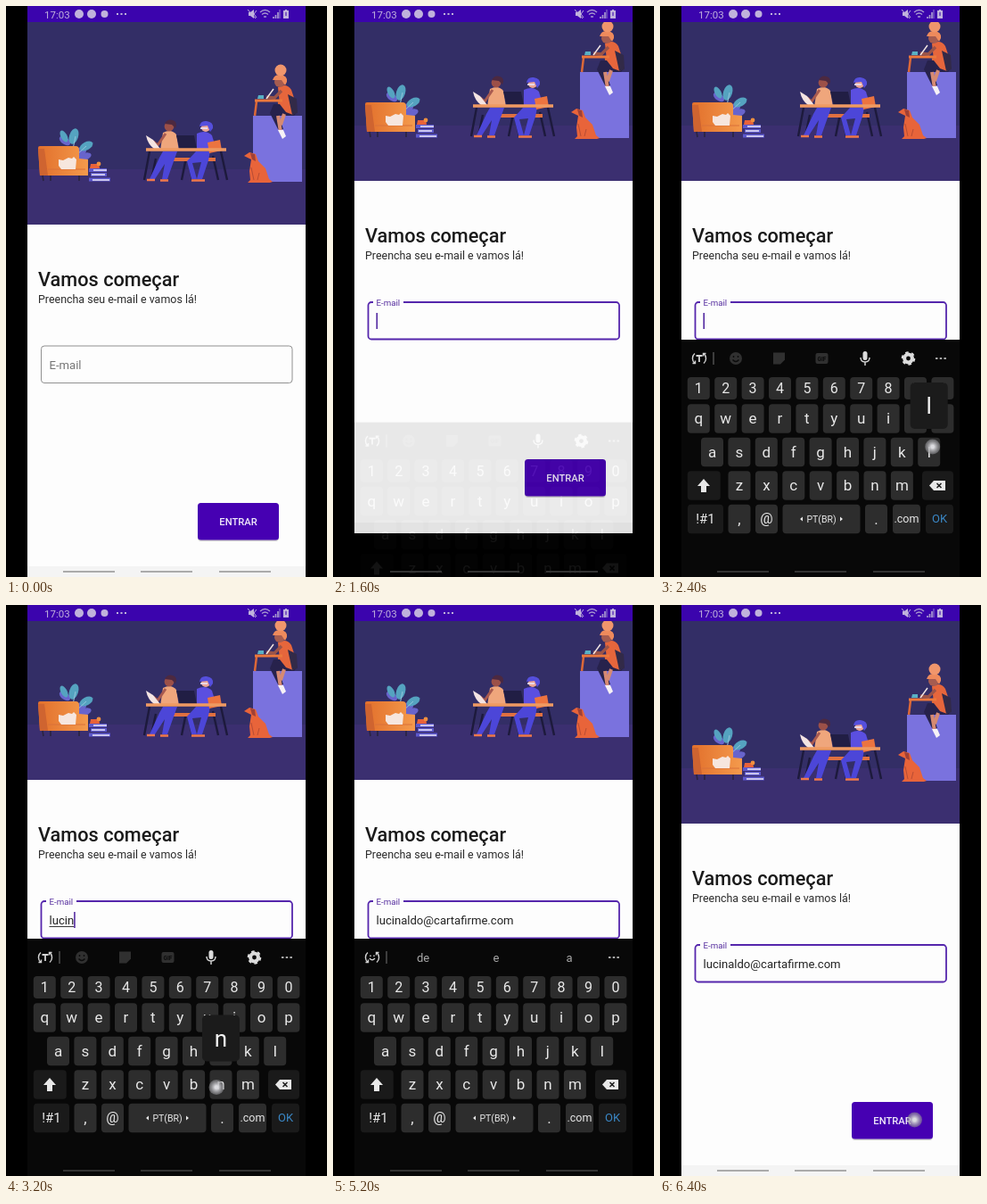
An HTML page for the animation above (6470 ms loop, 360 by 640 pixels).

```html
<!DOCTYPE html>
<html lang="pt-BR">
<head>
<meta charset="utf-8">
<title>Vamos começar</title>
<style>
  html, body { margin: 0; width: 100%; height: 100%; overflow: hidden; background: #000; }
  svg { display: block; width: 360px; height: 640px; font-family: Roboto, "Noto Sans", sans-serif; }
  .mid { text-anchor: middle; }
</style>
</head>
<body>
<svg id="stage" viewBox="0 0 360 640" xmlns="http://www.w3.org/2000/svg">
  <defs>
    <clipPath id="screen"><rect x="24" width="312" height="640"/></clipPath>
    <linearGradient id="sofa"><stop stop-color="#e2702c"/><stop offset="1" stop-color="#f49a4c"/></linearGradient>
    <radialGradient id="dot"><stop offset=".2" stop-color="#dcdce0"/><stop offset="1" stop-color="#88888c" stop-opacity=".55"/></radialGradient>
  </defs>
  <rect width="360" height="640"/>
  <g clip-path="url(#screen)">
    <g id="page">
      <rect x="24" y="0" width="312" height="640" fill="#fdfdfd"/>
      <rect x="24" y="628" width="312" height="12" fill="#f4f4f4"/>
      <g id="art">
        <rect x="24" y="18" width="312" height="227" fill="#332e66"/>
        <rect x="24" y="183" width="312" height="62" fill="#3b2f70"/>
        <!-- plant, sofa, cat, books -->
        <g fill="#6864cc">
          <ellipse cx="88" cy="169" rx="8" ry="4" transform="rotate(-20 88 169)"/>
          <ellipse cx="66" cy="151" rx="7" ry="4" transform="rotate(35 66 151)"/>
          <ellipse cx="83" cy="164" rx="8" ry="5" transform="rotate(-35 83 164)"/>
        </g>
        <g fill="#55a3c0">
          <ellipse cx="76" cy="146" rx="5" ry="9" transform="rotate(18 76 146)"/>
          <ellipse cx="90" cy="157" rx="8" ry="4.5" transform="rotate(-28 90 157)"/>
          <ellipse cx="65" cy="146" rx="3.5" ry="7" transform="rotate(-28 65 146)"/>
        </g>
        <path d="M78 146L73 170M90 157L78 168" stroke="#93c6dc" fill="none"/>
        <path d="M36 159q0-2 2-2h40q4 0 4 4v10l10 1v18H38z" fill="url(#sofa)"/>
        <path d="M36 160h7l4 30h-9z" fill="#cf6430"/>
        <path d="M47 183h42" stroke="#d9703a"/>
        <path d="M41 190l1 6M50 190v6M82 190v6" stroke="#2a2340" stroke-width="1.6"/>
        <path d="M59 172l5 1 6-3 4 1 2-2 3 3-1 11H62l-3-4z" fill="#f6e6de"/>
        <path d="M95 177h9l1 5H94z" fill="#e8623a"/><circle cx="104" cy="177" r="2.4" fill="#f0903f"/>
        <path d="M93 184h20M95 189h18M93 194.500h24" stroke="#5c58cc" stroke-width="4"/>
        <path d="M98 184h15M96 189h15M97 195h19" stroke="#eee9f8" stroke-width="1.7"/>
        <!-- table and two people -->
        <path d="M161 163l-6 32M241 163l7 32M168 171l-5 24M232 168l6 27M202 170l-5 25M204 170l5 25" stroke="#1d1a3c" stroke-width="2.4"/>
        <path d="M172 170h63v4h-62z" fill="#e07040"/>
        <path d="M176 163h16l-5 14-6 17h-6l3-17-11 17h-6l11-24z" fill="#4c46d8"/>
        <path d="M213 163h16l-2 10-7 21h-6l5-19-10 1 5 18h-6l-5-20z" fill="#4c46d8"/>
        <path d="M158 195h9M173 195.500h9M208 195.500h8M216 195.500h7" stroke="#f0784c" stroke-width="2.4"/>
        <path d="M176 142q9-5 15 2l3 18h-21z" fill="#efa67c"/>
        <path d="M179 143l-9 13-5-4" fill="none" stroke="#a85a50" stroke-width="3"/>
        <circle cx="183" cy="135" r="5.400" fill="#9c5048"/>
        <path d="M178 132q3-6 9-4 6 2 3 9l-4-4z" fill="#4c2940"/>
        <path d="M157 145l8 5 8 10h-7q-7-5-9-15z" fill="#f4e4e2"/>
        <path d="M214 143q10-5 17 2l5 17h-22z" fill="#5b4fe0"/>
        <circle cx="224" cy="136" r="5" fill="#eba596"/>
        <path d="M217 135q1-7 8-6 8 1 7 8l-3 4-3-7z" fill="#554fdc"/>
        <path d="M218 137h8" stroke="#ebe5fb" stroke-width="1.6"/>
        <path d="M191 145h20l3 16h-19z" fill="#211e44"/>
        <path d="M226 153l14-3 2 12-14 3z" fill="#ec7440"/>
        <path d="M157 161h90" stroke="#ef9a62" stroke-width="3.400"/>
        <!-- plinth with writer, dog -->
        <rect x="277" y="123" width="55" height="74" fill="#7a72de"/>
        <path d="M281 107l-2 16M306 107l2 16" stroke="#dc6838" stroke-width="2.500"/>
        <path d="M300 110h21l6 8-4 5h-17l5 15h-6l-9-18z" fill="#27224c"/>
        <path d="M305 123l3 18M312 121l-4 12" stroke="#d68a72" stroke-width="4"/>
        <path d="M305 139h6l3 7-4 3z" fill="#f7f2f6"/>
        <path d="M305 91q10-5 15 3l6 18-4 10-8-3-7-9z" fill="#e6663c"/>
        <path d="M316 99l10 5 1 16-6 2z" fill="#322a48"/>
        <path d="M309 95l-8 8-9-1" fill="none" stroke="#9c5448" stroke-width="3.400"/>
        <circle cx="307" cy="85" r="6" fill="#a65c50"/>
        <path d="M299 83q2-7 9-6 8 1 7 8l-2 4-4-6z" fill="#ee8a5c"/>
        <circle cx="308" cy="72" r="6.500" fill="#f0966c"/>
        <path d="M292 104l8-11" stroke="#f3e7e4" stroke-width="1.400"/>
        <path d="M279 106h31" stroke="#ec783c" stroke-width="3"/>
        <path d="M283 100h6v4h-7z" fill="#58b0c4"/>
        <path d="M267 168l6-4 7 2 3 8 8 8 4 12 4 3-3 1h-25l3-3-1-10 2-13z" fill="#e8643a"/>
        <path d="M274 165l5 1 1 8-4-2z" fill="#a04036"/><path d="M275 181l3 14M284 187l-2 8" stroke="#b84c34"/>
      </g>
      <text x="36" y="314" font-size="21.700" font-weight="500" fill="#1a1a1a">Vamos começar</text>
      <text x="36" y="333" font-size="12.450" fill="#2b2b2b">Preencha seu e-mail e vamos lá!</text>
      <rect id="box" x="39.500" y="381" width="281.500" height="41.500" rx="3.500" fill="none"/>
      <rect id="notch" x="45" y="377" width="34" height="8" fill="#fdfdfd"/>
      <text id="label" x="48.500">E-mail</text>
      <text id="email" x="48.500" y="407" font-size="13.100" fill="#222"></text>
      <path id="underline" stroke="#3a3a3a" stroke-width="1"/>
      <rect id="caret" y="393" width="1.500" height="18" fill="#4b1f9c"/>
      <rect x="215" y="559" width="91" height="41" rx="4" fill="#000" opacity=".18"/>
      <rect x="215" y="557" width="91" height="41.500" rx="3.500" fill="#4600b2"/>
      <text x="260.500" y="582" class="mid" font-size="11.200" font-weight="500" fill="#f1eafa">ENTRAR</text>
    </g>
    <g id="status" fill="#c0b2dc">
      <rect x="24" width="312" height="18" fill="#3b04ad"/>
      <text x="43" y="13.500" font-size="11.500">17:03</text>
      <circle cx="82" cy="9" r="5"/><circle cx="96" cy="9" r="5"/><circle cx="110.500" cy="9" r="4"/>
      <path d="M124 9h2m2.500 0h2m2.500 0h2" stroke="#c0b2dc" stroke-width="1.800"/>
      <path d="M272 7h2l4-3v10l-4-3h-2z"/>
      <path d="M271 4l9 10M281 5l-3 4 3 4" fill="none" stroke="#c0b2dc"/>
      <path d="M285 7q5.500-5 11 0M287 9.500q3.500-3 7 0M289 12h3" fill="none" stroke="#a898d0" stroke-width="1.400"/>
      <path d="M300 14v-2M302.500 14v-4M305 14V7" stroke="#a898d0" stroke-width="1.700"/>
      <path d="M307 14V4" stroke="#6f50c0" stroke-width="1.700"/>
      <path d="M311 5h2V4h2v1h2v9h-6z"/><path d="M314 7v4" stroke="#3b04ad"/>
    </g>
    <g id="keyboard">
      <rect x="24" y="374" width="312" height="266" fill="#080808"/>
      <g fill="none" stroke="#d4d4d4" stroke-width="1.400">
        <path d="M39 400.500a7.200 7.200 0 0 1 0-11M49 389.500a7.200 7.200 0 0 1 0 11M36.500 400.500h3v-3M51.500 389.500h-3v3"/>
        <path d="M60 388v14" stroke="#555"/>
        <path id="toolT" d="M40.500 392h7M44 392v7" stroke-width="1.800"/>
        <path id="toolSmile" d="M42 392.500v1.500M46 392.500v1.500M41 396q3 3.500 6 0"/>
      </g>
      <g id="tools">
        <g fill="#303030">
          <circle cx="85" cy="395" r="7"/><path d="M127 388.500h13v8l-5 5h-8z"/><rect x="174.500" y="389" width="14" height="12" rx="2"/>
        </g>
        <path d="M82.500 392v2M87.500 392v2M81.500 396.500q3.500 4 7 0" fill="none" stroke="#0c0c0c" stroke-width="1.400"/>
        <text x="181.500" y="397.500" class="mid" font-size="6.500" font-weight="700" fill="#0c0c0c">GIF</text>
        <rect x="227.500" y="387" width="5" height="10" rx="2.500" fill="#dcdcdc"/>
        <path d="M225 394q0 5 5 5t5-5M230 399v4" fill="none" stroke="#dcdcdc" stroke-width="1.400"/>
        <circle cx="278.500" cy="395" r="4.400" fill="none" stroke="#dcdcdc" stroke-width="4"/>
        <circle cx="278.500" cy="395" r="6.600" fill="none" stroke="#dcdcdc" stroke-width="2.400" stroke-dasharray="3.450"/>
      </g>
      <g id="words" class="mid" font-size="13" fill="#aaa"><text x="101" y="400">de</text><text x="183" y="400">e</text><text x="265" y="400">a</text></g>
      <path d="M309 395h2.500m2.200 0h2.500m2.200 0h2.500" stroke="#aaa" stroke-width="2"/>
      <g id="keys"></g>
    </g>
    <path id="nav" d="M64 634h58M151 634h58M239 634h58" stroke-width="2.200"/>
    <g id="popup"><rect x="-21" y="-26" width="42" height="52" rx="5" fill="#1b1b1b"/><text class="mid" y="9" font-size="26" fill="#f4f4f4"></text></g>
    <circle id="touch" r="8.500" fill="url(#dot)"/>
  </g>
</svg>
<script>
const LOOP = 6470, PITCH = 30.4;
const $ = id => document.getElementById(id);
const set = (el, attrs) => { for (const k in attrs) el.setAttribute(k, attrs[k]); };
const show = (el, on) => el.setAttribute('visibility', on ? 'visible' : 'hidden');
const ramp = (t, a, b) => Math.min(1, Math.max(0, (t - a) / (b - a)));
const easeOut = x => 1 - (1 - x) ** 3;
const lerp = (a, b, k) => a + (b - a) * k;

// Keyboard
const INK = '#e8e8e8', DARK_KEY = '#1a1a1a';
const keyPos = {};
let keyMarkup = '';
function addKey(label, x, y, w, h = 32.5, size = 17, color = INK, fill = '#2d2d2d') {
  keyPos[label] = [x, y];
  keyMarkup += `<rect x="${x - w / 2}" y="${y - h / 2}" width="${w}" height="${h}" rx="4" fill="${fill}"/>` +
    `<text x="${x}" y="${y + size * .34}" class="mid" font-size="${size}" fill="${color}">${label}</text>`;
}
function addRow(chars, x, y, h, size) {
  [...chars].forEach((c, i) => addKey(c, x + i * PITCH, y, 25, h, size));
}
addRow('1234567890', 43.3, 428.5, 25, 16);
addRow('qwertyuiop', 43.3, 462.5);
addRow('asdfghjkl', 58.5, 500);
addRow('zxcvbnm', 89, 537.5);
addKey('', 49.3, 537.5, 37, 32.5, 17, INK, DARK_KEY);
addKey('', 311.5, 537.5, 35, 32.5, 17, INK, DARK_KEY);
addKey('!#1', 51, 575, 40, 32.5, 15, INK, DARK_KEY);
addKey(',', 89, 575, 25);
addKey('@', 119.5, 575, 25, 32.5, 16);
addKey('PT(BR)', 181, 575, 87, 32.5, 10.5);
addKey('.', 242.5, 575, 25);
addKey('.com', 276.5, 575, 31, 32.5, 12.5);
addKey('OK', 313.5, 575, 31, 32.5, 13, '#3a86c4', DARK_KEY);
$('keys').innerHTML = keyMarkup +
  `<g fill="${INK}"><path d="M49 530l7 8h-4v7h-6v-7h-4z"/><path d="M302 537.500l5-5.500h13v11h-13z"/>
   <path d="M160 572.500v5l-3-2.500zM202 572.500v5l3-2.500z"/></g>
   <path d="M310.500 535l5 5m0-5l-5 5" stroke="${DARK_KEY}" stroke-width="1.500"/>`;

// Typing: each press is [key, time]; the rest of the address is completed at once.
const ADDRESS = 'lucinaldo@cartafirme.com';
const FOCUS = 1380, FILLED = 4540, HOLD = 115;
const presses = [2350, 2590, 2790, 2980, 3130, 3400, 3560, 3720, 3880, 4080, 4220, 4340]
  .map((time, i) => [ADDRESS[i], time]);
const typedAt = time => time + 60;

function caretOn(t) {
  let reset = FOCUS;
  for (const [, time] of presses) if (t >= typedAt(time)) reset = typedAt(time);
  if (t >= FILLED) reset = FILLED;
  return t >= FOCUS && (t - reset) % 1000 < 500;
}

function drawField(t) {
  const focus = easeOut(ramp(t, FOCUS, FOCUS + 150));
  const count = t >= FILLED ? ADDRESS.length : presses.filter(p => t >= typedAt(p[1])).length;
  const focused = focus > 0;
  set($('box'), { stroke: focused ? '#5526ac' : '#909090', 'stroke-width': focused ? 1.8 : 1 });
  set($('notch'), { transform: `translate(${62 * (1 - focus)} 0) scale(${focus} 1)` });
  set($('label'), { y: lerp(406.5, 385.2, focus), 'font-size': lerp(13.1, 9.7, focus), fill: focused ? '#5830a0' : '#757575' });
  $('email').textContent = ADDRESS.slice(0, count);
  const end = 48.5 + (count ? $('email').getComputedTextLength() : 0);
  set($('caret'), { x: end });
  show($('caret'), caretOn(t));
  set($('underline'), { d: `M48.500 409.500H${end}` });
  show($('underline'), count > 0 && t < FILLED);
}

function drawKeyboard(t) {
  const closing = ramp(t, 5420, 5620);
  const opening = easeOut(ramp(t, 1580, 1860));
  const leaving = t >= 5400;
  const drop = leaving ? 110 * closing : 117 * (1 - opening);
  const alpha = leaving ? 1 - closing : ramp(t, 1586, 1780);
  const open = alpha > 0, done = t >= FILLED;
  set($('keyboard'), { transform: `translate(0 ${drop})`, opacity: alpha });
  show($('keyboard'), open);
  for (const id of ['tools', 'toolT']) show($(id), open && !done);
  for (const id of ['words', 'toolSmile']) show($(id), open && done);
}

function drawTouch(t) {
  const press = presses.find(p => t >= p[1] && t < p[1] + HOLD);
  const tap = t >= 6340;
  show($('popup'), !!press);
  if (press) {
    const [x, y] = keyPos[press[0]];
    set($('popup'), { transform: `translate(${x} ${y - 52})` });
    $('popup').lastElementChild.textContent = press[0];
    set($('touch'), { cx: x + (x > 270 ? 4 : -5), cy: y + (y > 520 ? 3 : -6) });
  }
  if (tap) set($('touch'), { cx: 285.5, cy: 577 });
  show($('touch'), !!press || tap);
}

function render(t) {
  const pan = t < 5400 ? easeOut(ramp(t, 1410, 1590)) : 1 - easeOut(ramp(t, 5420, 5640));
  set($('page'), { transform: `translate(0 ${-49 * pan})` });
  set($('nav'), { stroke: pan > .2 ? '#333' : '#ababab' });
  drawField(t);
  drawKeyboard(t);
  drawTouch(t);
}

const start = performance.now();
function tick() {
  render((performance.now() - start) % LOOP);
  requestAnimationFrame(tick);
}
tick();
</script>
</body>
</html>
```
